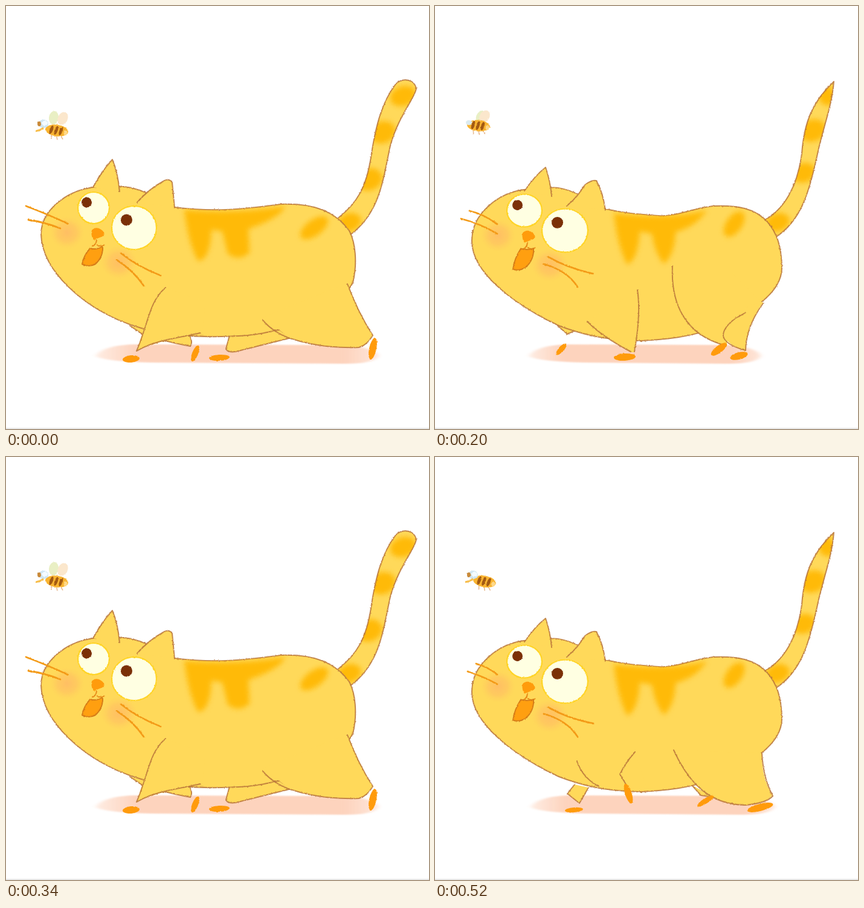
An HTML page for the animation above (0.57 s loop, 700 px wide and 700 px high).

```html
<!DOCTYPE html>
<html lang="en">
<head>
<meta charset="utf-8">
<title>Cat and bee</title>
<style>
html, body { margin: 0; width: 100%; height: 100%; overflow: hidden; background: #fff; }
svg { display: block; width: 100%; height: 100%; }
filter { color-interpolation-filters: sRGB; }
.fur { fill: #ffd95a; }
.line { fill: none; stroke: #b9763a; stroke-opacity: .85; stroke-width: 2; stroke-linecap: round; stroke-linejoin: round; }
.foot { fill: #ff9b0c; }
.mark { fill: #ffba08; filter: url(#soft); }
.whisker { fill: none; stroke: #f39a17; stroke-width: 2.8; stroke-linecap: round; }
.eye { fill: #ffffe2; stroke: #ffd426; stroke-width: 2.2; }
.pupil { fill: #7b3007; }
</style>
</head>
<body>
<svg id="stage" viewBox="0 0 700 700">
  <defs>
    <filter id="soft" x="-30%" y="-30%" width="160%" height="160%"><feGaussianBlur stdDeviation="4"/></filter>
    <filter id="haze" x="-10%" y="-30%" width="120%" height="160%"><feGaussianBlur stdDeviation="4 .8"/></filter>
    <filter id="rough" x="-5%" y="-5%" width="110%" height="110%">
      <feTurbulence type="fractalNoise" baseFrequency=".35" numOctaves="2" seed="4"/>
      <feDisplacementMap in="SourceGraphic" scale="2.5" xChannelSelector="R" yChannelSelector="G"/>
    </filter>
    <radialGradient id="blush">
      <stop offset="0" stop-color="#ffb866" stop-opacity=".8"/>
      <stop offset=".55" stop-color="#ffbe62" stop-opacity=".55"/>
      <stop offset="1" stop-color="#ffcc5c" stop-opacity="0"/>
    </radialGradient>
    <linearGradient id="ground">
      <stop offset="0" stop-color="#fdd5c0" stop-opacity=".45"/>
      <stop offset=".14" stop-color="#fdd3bd"/>
      <stop offset=".88" stop-color="#fdd3bd"/>
      <stop offset="1" stop-color="#fdd5c0" stop-opacity=".6"/>
    </linearGradient>
  </defs>
</svg>
<script>
const stage = document.getElementById('stage');
const path = (cls, d) => `<path class="${cls}" d="${d}"/>`;
const solid = d => path('fur', d) + path('line', d);
const oval = (cls, x, y, rx, ry = rx, turn = 0, extra = '') =>
  `<ellipse class="${cls}" cx="${x}" cy="${y}" rx="${rx}" ry="${ry}" transform="rotate(${turn} ${x} ${y})" ${extra}/>`;
const tint = (color, x, y, rx, ry = rx, turn = 0) => oval('', x, y, rx, ry, turn, `fill="${color}"`);

// Standing body (wide) and the rounder walking body, whose head may shift
const wideBody = 'M144 300C100 306 58 338 58 378C60 440 130 500 205 527C260 547 330 550 400 545' +
  'C440 541 540 520 574 458C582 425 578 390 568 372C545 340 510 326 455 328C400 335 350 342 279 333C260 322 215 296 185 299Z';
const roundBody = (x, y) => `M${142 + x} ${300 + y}C${100 + x} ${306 + y} ${57 + x} ${340 + y} ${57 + x} 388` +
  'C60 440 130 494 205 529C260 550 300 553 340 554C400 551 420 545 437 541C500 530 535 495 540 490' +
  'C565 470 575 450 574 430C573 395 565 375 550 357C530 335 500 329 460 331C420 336 400 349 370 347' +
  `C330 344 310 342 ${279 + x} ${332 + y}C260 322 215 ${292 + y} ${185 + x} ${297 + y}Z`;

const heads = {
  wide: {
    ears: ['M144 300Q158 274 176 254Q185 275 188 307', 'M217 325Q236 303 262 289Q270 285 275 292L279 334'],
    at: [0, 0], eye: [26, 26, 37, 36], jaw: 0
  },
  high: {
    ears: ['M142 301Q160 277 177 254Q187 278 189 306', 'M217 325Q243 296 269 286Q276 306 276 333'],
    at: [-1.5, -3], eye: [29, 27, 38, 35], jaw: 5
  },
  low: {
    ears: ['M148 306Q166 280 183 267Q191 290 193 315', 'M218 331Q238 314 247 297Q259 287 267 289Q278 308 282 338'],
    at: [3, 4.5], eye: [29, 27, 38, 36], jaw: 4
  }
};

const tails = {
  wide: 'M547 353C582 326 596 300 604 250C612 195 623 158 645 129C657 118 675 121 679 136C678 151 650 180 636 231C624 285 620 342 569 379',
  high: 'M545 353C583 340 597 310 602 264C606 195 617 161 665 123C665 151 638 188 629 240C616 300 609 349 565 383',
  low: 'M542 356C578 338 600 298 607 244C611 191 625 158 660 125C657 165 643 199 634 240C620 306 607 355 563 383'
};

function head(kind, whiskers) {
  const h = heads[kind], [x, y] = h.at, [a, b, c, d] = h.eye, j = h.jaw;
  return h.ears.map(solid).join('') +
    `<g transform="translate(${x} ${y})">` +
    oval('', 101, 375, 29, 27, 0, 'fill="url(#blush)"') +
    oval('', 187, 424, 31, 28, 0, 'fill="url(#blush)"') +
    oval('eye', 145, 334, a, b) + oval('eye', 212, 367, c, d) +
    oval('pupil', 133.5, 325, 8.5) + oval('pupil', 199.5, 354, 9.5) +
    path('foot', 'M142 371Q150 363 160 372Q166 379 158 382L145 387Q140 380 142 371Z') +
    '<path d="M150 386Q150 395 142 398M150 395Q158 400 163 395" fill="none" stroke="#e78a18" stroke-width="2"/>' +
    `<path d="M139 ${401 - j}Q150 ${404 - j} 160 ${398 - j / 3}Q161 415 148 427Q137 ${433 + j / 2} 126 ${427 + j}` +
    `Q128 414 139 ${401 - j}Z" fill="#ff9f10" stroke="#d67d18" stroke-width="2"/></g>` +
    whiskers.map(w => path('whisker', w)).join('');
}

const wing = (color, x, y, turn) => tint(color, x, y, 8, 11, turn);

function bee(x, y, turn, wings, face) {
  const stripes = [-9, -1, 7].map(s => tint('#a35a12', s, 0, 2.6, 7.5, 12)).join('');
  const legs = '<path d="M-8 8l1 7M1 9l2 6M8 8l4 5" stroke="#e6b78c" stroke-width="1.5"/>';
  return wings.map(w => wing(...w)).join('') +
    `<g transform="translate(${x} ${y}) rotate(${turn})">${legs}${tint('#f9b431', 0, 0, 19, 9.5)}${stripes}` +
    `${tint('#ffd98a', 15, 2, 3, 4)}</g>` + face;
}
const goggles = (x, y) => tint('#cfe6f2', x, y, 8, 7) + tint('#f4fbff', x + 2, y - 1, 5, 4) +
  tint('#c98a3a', x - 7, y, 3, 4) +
  `<path d="M${x - 13} ${y + 12}q7 -1 13 -5" fill="none" stroke="#f7bd4a" stroke-width="3"/>`;

const markWide = 'M295 337Q380 345 462 331Q455 350 401 369L403 408Q386 424 367 410L358 373L340 370Q338 420 318 422Q302 395 295 337Z';
const markRound = 'M296 343Q385 354 450 338Q432 365 398 374Q397 410 379 427Q364 410 359 377L339 373Q336 420 318 428Q302 398 296 343Z';
const greens = '#e9efc4', peach = '#fbe7cc';

// shadow: left, right; feet: x, y, rx, ry, turn
const poses = [
  {
    head: 'wide', shadow: [145, 620],
    whiskers: ['M33 331Q65 343 102 360', 'M37 354Q62 357 90 368', 'M190 409Q217 431 256 446', 'M183 420Q211 438 228 463'],
    far: ['M205 529Q225 543 228 544Q265 556 305 563Q310 556 303 545', 'M370 545L364 567Q366 574 380 572L472 549L440 528'],
    near: ['M264 466Q236 490 232 523L216 571Q245 555 325 541L330 490Z', 'M565 458Q582 505 607 545Q598 561 584 565Q522 567 470 550L425 515Z'],
    lines: ['M264 466C236 490 236 525 216 571Q238 558 268 552T322 541', 'M565 460Q583 508 607 545Q598 561 584 565Q522 567 470 550Q442 540 425 520'],
    feet: [[207, 584, 14, 6, -5], [313, 575, 5, 14, 22], [353, 582, 17, 5, -3], [607, 567, 6, 18, 12]],
    bee: bee(84, 206, 8, [[greens, 79, 185, 8], [peach, 94, 186, 25]], goggles(62, 195))
  },
  {
    head: 'high', shadow: [190, 613],
    whiskers: ['M69 345Q88 351 98 360', 'M68 357L86 371', 'M183 404Q216 426 257 437', 'M182 418Q212 430 231 458'],
    far: ['M208 532Q224 552 230 554L263 560', 'M418 542L450 574L476 551L450 530'],
    near: ['M245 494Q260 536 264 573L271 573Q318 545 334 503Z', 'M400 482Q428 528 466 548Q510 566 545 555Q560 549 565 535Q543 522 535 478Z'],
    lines: ['M245 494Q260 536 264 572', 'M334 503Q318 541 270 573', 'M400 482C414 518 437 538 466 548Q510 566 545 555Q560 549 565 535Q543 522 535 478'],
    feet: [[255, 583, 17, 6, -4], [280, 571, 8, 2.5, 25], [426, 584, 33, 5, -3], [583, 545, 5, 19, -42]],
    bee: bee(76, 199, 10, [], tint('#cfe8f2', 57, 194, 6, 5))
  },
  {
    head: 'low', shadow: [152, 543],
    whiskers: ['M57 339Q80 344 103 361', 'M43 352Q75 360 103 377', 'M187 415Q220 434 262 443', 'M180 427Q219 438 236 465'],
    far: ['M203 529L219 543L232 537'],
    near: ['M252 522Q276 545 324 573L330 573Q340 520 335 470Z', 'M393 430C390 490 412 545 482 562L495 517Q530 500 543 492L480 430Z',
      'M543 490Q515 530 514 571Q487 563 477 545Q477 532 497 517L520 495Z'],
    lines: ['M252 522Q276 547 324 572', 'M335 470Q341 510 330 572', 'M393 430C390 490 412 545 482 562', 'M543 492Q515 530 514 570Q478 560 477 545Q477 532 497 517L513 508'],
    feet: [[314, 581, 18, 6, -3], [209, 568, 4.5, 12, 42], [470, 568, 6, 16, 53], [503, 579, 15, 6, -14]],
    bee: bee(72, 198, 5, [[greens, 76, 184, 20], [peach, 82, 183, 30]], tint('#dcebf0', 56, 193, 5, 4))
  },
  {
    head: 'high', shadow: [147, 583],
    whiskers: ['M68 345Q86 350 97 360', 'M67 356L85 369', 'M183 404Q216 426 256 437', 'M182 418Q211 430 229 457'],
    far: ['M203 529L211 535L218 533', 'M543 490Q552 522 568 546Q562 554 530 549L490 546', 'M177 565L183 572L190 563'],
    near: ['M333 470Q316 515 342 554L370 552L370 480Z', 'M390 430C382 500 418 560 485 577Q478 555 505 530Q520 507 545 490L480 420Z'],
    lines: ['M247 518Q270 546 315 553', 'M333 470Q314 520 342 553', 'M390 430C382 500 418 560 485 577Q478 555 502 535', 'M519 507L545 490'],
    feet: [[172, 584, 17, 4, -4], [348, 567, 5.5, 17, 0], [452, 586, 34, 5, -1], [574, 557, 4.5, 16, -33]],
    bee: bee(74, 206, 14, [[greens, 70, 188, 0], [peach, 83, 188, 25]], tint('#cfe8f2', 55, 199, 6, 7))
  },
  {
    head: 'low', shadow: [155, 566],
    whiskers: ['M68 342Q87 347 103 360', 'M54 355Q80 363 103 376', 'M187 414Q220 433 262 441', 'M180 425Q219 436 236 463'],
    far: ['M231 542L219 557L239 573L254 547', 'M425 543L440 560L462 563'],
    near: ['M331 488L306 525L319 547L350 545Z', 'M395 485C420 540 455 576 515 576Q550 572 558 560Q540 530 541 490Z'],
    lines: ['M235 504Q245 532 271 545', 'M331 488Q315 506 306 525L318 545', 'M395 485C420 540 455 576 515 576Q550 572 559 561Q543 532 541 490'],
    feet: [[230, 584, 15, 4, -5], [320, 557, 5.5, 17, -18], [448, 569, 4.5, 16, 58], [538, 580, 22, 6, -14]],
    bee: bee(82, 206, 10, [], goggles(63, 195))
  }
];

function draw(p, i) {
  const wide = p.head === 'wide', tail = tails[p.head];
  const [x, y] = p.head === 'low' ? [4, 4] : [0, 0];
  const body = wide ? wideBody : roundBody(x, y);
  const [l, r] = p.shadow;
  const bands = wide ? [[657, 149, 22, 16], [623, 209, 22, 18], [601, 287, 22, 18], [568, 358, 20, 15]]
    : [[648, 148, 14, 17], [625, 206, 22, 18], [610, 276, 20, 16], [567, 358, 20, 15]];
  const hip = wide ? oval('mark', 510, 367, 27, 13, -36) : oval('mark', 495, 361, 24, 13, -55);
  return `<g class="pose" visibility="hidden">
    <clipPath id="body${i}"><path d="${body}"/></clipPath><clipPath id="tail${i}"><path d="${tail}"/></clipPath>
    <path d="M${l + 4} 579Q${l + 14} 563 ${l + 62} 560L${r - 55} 561Q${r - 8} 566 ${r - 4} 579Q${r - 10} 592 ${r - 60} 592L${l + 95} 590Q${l + 15} 588 ${l + 4} 579Z" fill="url(#ground)" filter="url(#haze)"/>
    <g filter="url(#rough)">
      ${path('fur', tail)}<g clip-path="url(#tail${i})">${bands.map(b => oval('mark', ...b, -20)).join('')}</g>${path('line', tail)}
      ${p.far.map(solid).join('')}${solid(body)}
      ${p.near.map(d => path('fur', d)).join('')}
      <g clip-path="url(#body${i})">${path('mark', wide ? markWide : markRound)}${hip}</g>
      ${p.lines.map(d => path('line', d)).join('')}
      ${p.feet.map(f => oval('foot', ...f)).join('')}
      ${head(p.head, p.whiskers)}${p.bee}
    </g></g>`;
}

stage.insertAdjacentHTML('beforeend',
  poses.map(draw).join('') + '<path d="M0 699H700" stroke="#e9e9e9" stroke-width="2"/>');
const groups = [...stage.querySelectorAll('.pose')];

// start time, pose
const steps = [[0, 0], [170, 1], [200, 2], [240, 0], [400, 3], [440, 4]];
const loop = 570, start = performance.now();

function tick() {
  const t = (performance.now() - start) % loop;
  const now = steps.filter(s => s[0] <= t).pop()[1];
  groups.forEach((g, i) => g.setAttribute('visibility', i === now ? 'visible' : 'hidden'));
  requestAnimationFrame(tick);
}
tick();
</script>
</body>
</html>
```
